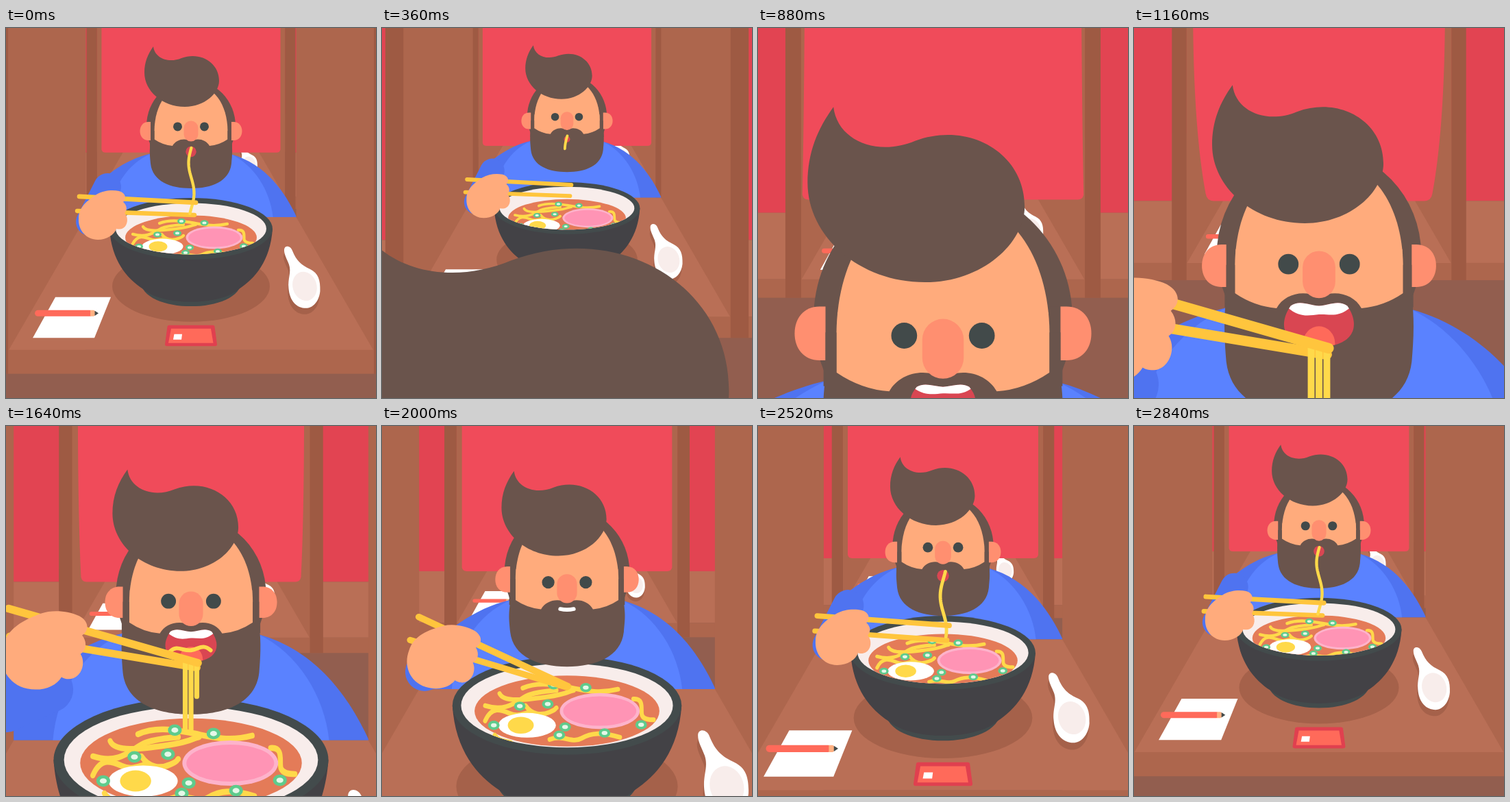
These frames come from a looping animation (540 by 540 pixels, 2880 ms). An HTML page with a canvas:

```html
<!DOCTYPE html>
<html lang="en">
<head>
<meta charset="utf-8">
<title>Endless noodles</title>
<style>
html, body { margin: 0; width: 100%; height: 100%; overflow: hidden; background: #ad664d; }
canvas { display: block; width: 100vmin; height: 100vmin; }
</style>
</head>
<body>
<canvas id="stage" width="540" height="540"></canvas>
<script>
const ctx = document.getElementById('stage').getContext('2d');
const LOOP = 2880, DEPTH = 0.945, VX = 270, VY = 9.3;
const C = {
  wall: '#ad664d', table: '#b96f56', shade: '#a5614a', pillar: '#9e5a43', floor: '#925e4f',
  red: '#f04b5a', sideRed: '#e24452', skin: '#ffab7c', blush: '#ff8f70', hair: '#6a544c',
  blue: '#5a82ff', arm: '#4f73f0', rim: '#434b4c', bowl: '#434246', cream: '#f8edeb',
  broth: '#e47b58', noodle: '#ffd94a', stick: '#ffc53d', dark: '#424a4a', mouth: '#d94652',
  coral: '#ff6a5a', white: '#fff'
};

const lerp = (a, b, p) => a + (b - a) * p;
const ramp = (t, a, b) => Math.min(1, Math.max(0, (t - a) / (b - a)));
const ease = p => p * p * (3 - 2 * p);

// Eased interpolation between [time, vector] keys.
function at(keys, t) {
  let i = 0;
  while (i < keys.length - 2 && t > keys[i + 1][0]) i++;
  const [t0, a] = keys[i], [t1, b] = keys[i + 1], p = ease(ramp(t, t0, t1));
  return a.map((v, j) => lerp(v, b[j], p));
}

function fill(color, d) { ctx.fillStyle = color; ctx.fill(new Path2D(d)); }
function stroke(color, width, d) {
  ctx.strokeStyle = color;
  ctx.lineWidth = width;
  ctx.lineCap = ctx.lineJoin = 'round';
  ctx.stroke(new Path2D(d));
}
function rect(color, x, y, w, h) { ctx.fillStyle = color; ctx.fillRect(x, y, w, h); }
function ellipse(color, x, y, rx, ry = rx, turn = 0) {
  ctx.fillStyle = color;
  ctx.beginPath();
  ctx.ellipse(x, y, rx, ry, turn, 0, 7);
  ctx.fill();
}
function group(draw) { ctx.save(); draw(); ctx.restore(); }

// skull, hair, face, jaw | hand x, y, turn | upper stick | lower stick | elbow | mouth opening
const DOWN = [11.5, 22.5, 21, 18.6, 140.5, 241, 18, 116, 201, 271, 273, 107, 225, 270, 274, 122, 258, 0];
const LIFT = [6, 14.5, 11.5, 19.6, 142, 197, 12, 112, 162, 276, 209, 113, 186, 275, 213, 110, 249, 1];
const SLURP = [13, 14, 13.5, 11.5, 140.5, 272.6, 1, 108, 245.5, 278, 258, 105, 265, 275, 277, 122, 283, 0];
const REST = [0, 0, 0, 0, 140.5, 272.6, 0, 107, 246, 277, 255, 104, 267, 275, 273, 122, 283, 0];
const POSES = [[-2180, DOWN], [-1800, LIFT], [-1210, LIFT], [-910, DOWN], [-830, DOWN],
  [-430, SLURP], [-370, SLURP], [-30, REST], [0, REST]];
const CURTAIN = [[100, [2.3]], [1150, [-0.3]], [1900, [0]]];

function drawRoom() {
  for (const side of [-1, 1]) group(() => {
    ctx.translate(VX, 0);
    ctx.scale(side, 1);
    rect(C.sideRed, 296, -60, 1500, 405);
    rect(C.table, 296, 345, 1500, 125);
    rect(C.wall, 153.6, -60, 114, 531);
    rect(C.wall, 0, 470, 1800, 35);
    rect(C.pillar, 267, -60, 29.5, 565);
  });
  rect(C.floor, -1530, 505, 3600, 1600);
}

function drawBody() {
  group(() => {
    ctx.beginPath();
    ctx.rect(116.4, 100, 307.2, 176);
    ctx.clip();
    fill(C.arm, 'M212 183C160 195 118 235 98 280H426C410 244 382 199 328 184Z');
    fill(C.blue, 'M212 183C175 199 153 236 150 280H390C387 240 364 201 328 184Z');
  });
}

function drawTable() {
  fill(C.table, 'M116.4 276H423.6L536 470H4Z');
  ellipse(C.shade, 270, 377, 115, 52);
  fill(C.white, 'M72 393H153L129 452.5H39Z');
  stroke(C.coral, 9, 'M46.5 416.5H122');
  fill('#ffb183', 'M123 412H128L132 415V418L128 421H123Z');
  fill(C.dark, 'M129.5 412.8L135 416.5L129.5 420.2Z');
  fill('#e0404f', 'M238 434H302Q304 434 304.5 436L308 462Q308 464.5 305 464.5H235Q232 464.5 232 462L235.5 436Q236 434 238 434Z');
  fill(C.coral, 'M241 439H299L302.5 460H237Z');
  fill(C.white, 'M245.5 447H257L256 455H244Z');
  const spoon = 'M406 324C406 317 415 317 418 325C424 340 431 346 444 352C456 358 459 368 458.5 384C457 400 447 409 438 409C424 409 414 398 412.5 380C411 365 417 357 413 345C410 337 406 331 406 324Z';
  group(() => { ctx.translate(-1, 9); fill(C.shade, spoon); });
  fill(C.white, spoon);
  ellipse(C.cream, 436, 377, 17.5, 21.5, -0.3);
}

const NOODLES = ['M-85 9C-78-5-68-1-60 2S-48 3-39 1', 'M-85-5C-60 2-50-12-39-15S-22-18-11-19',
  'M-70-16C-66-8-45-10-21-13S0-18 7-19', 'M-46-21C-30-27-14-24 0-22S30-15 53-20',
  'M69-11C81-12 76 0 78 4S86 8 90 8', 'M-18 26C-4 21 5 30 15 25S36 19 55 24',
  'M-43-5C-36 4-26 4-18 1S-13-2-11-3', 'M-75 22C-70 29-62 27-58 29'];
const HERBS = [[-49, -4.5], [-20, -6.5], [19.5, -21.5], [-76, 13], [-2, 14.5], [-8, 22], [39, 20], [77, 12.5], [-14, -24]];

// The bowl is seen more from above the nearer it is.
function drawBowl(d) {
  const ry = Math.max(25, 45 - 21 * (d - 1));
  fill(C.rim, 'M196 368C197 419 343 419 344 368Z');
  fill(C.bowl, 'M151 293C154 340 177 366 200 381C228 406 312 406 340 381C363 366 386 340 389 293Z');
  ellipse(C.rim, 270, 293, 119, ry);
  group(() => {
    ctx.beginPath();
    ctx.ellipse(270, 293, 110, ry - 7.5, 0, 0, 7);
    ctx.clip();
    rect(C.cream, 150, 200, 240, 200);
    ctx.translate(270, 306 - 1.2 * (ry - 45));
    ctx.scale(1, ry / 45);
    ellipse(C.broth, 0, 0, 96, 32.5);
    NOODLES.forEach(n => stroke(C.noodle, 4.3, n));
    ellipse(C.white, -41.5, 13, 30, 11.3);
    ellipse(C.noodle, -48, 13, 13.5, 7.7);
    ellipse('#fdb3cb', 34, 0, 41.5, 16.5);
    ellipse('#ff94b5', 34, 0, 38, 13.5);
    for (const [x, y] of HERBS) {
      ellipse('#5ecb8c', x, y, 6, 4.2);
      ellipse('#e6f7e8', x, y, 3, 1.9);
    }
  });
}

function drawMouth(tau, face, open) {
  group(() => {
    ctx.translate(270, 168.5 + face);
    if (open > 0.12) {
      ctx.scale(lerp(0.5, 1, open), lerp(0.25, 1, open));
      ctx.clip(new Path2D('M-18 2C-12-2-6 2 0 2S12-2 18 2C27 15 22 28 0 28S-27 15-18 2Z'));
      rect(C.mouth, -30, -5, 60, 40);
      ellipse(C.coral, 0, 26, 10.2, 11);
      if (tau > -1450) stroke(C.noodle, 3.5, 'M-18 19C-12 13-7 19 0 18S10 12 17 18');
      fill(C.white, 'M-20 0V3C-12 10-6 8 0 7.5S12 10 20 3V-4H-20Z');
    } else if (tau < -720) {
      stroke(C.white, 4, 'M-7 3.2Q0 4.8 7 3.2');
    } else {
      ellipse(C.mouth, 0, 12, lerp(7.7, 3.3, ramp(tau, 150, 500)));
    }
  });
}

function drawHead(tau, skull, hair, face, jaw, open) {
  group(() => {
    ctx.translate(0, skull);
    ellipse(C.hair, 270, 143, 65, 67);
    rect(C.skin, 214, 140, 112, 50);
    for (const side of [-1, 1]) group(() => {
      ctx.translate(270, 0);
      ctx.scale(side, 1);
      rect(C.hair, 53, 137, 7, 40);
      fill(C.blush, 'M59 137H62C70 137 74.5 143 74.5 150.5S70 164 62 164H59Z');
    });
    fill(C.skin, 'M216.5 180V150C217 112 236 82 270 82S323 112 323.5 150V180Z');
  });
  const f = y => y + face, j = y => y + jaw;
  fill(C.hair, `M211 ${150 + skull}H216.5V${f(162.5)}Q229 ${f(171)} 243 ${f(172)}
    C248 ${f(163)} 260 ${f(160)} 270 ${f(165)}C280 ${f(160)} 292 ${f(163)} 297 ${f(172)}
    Q311 ${f(171)} 323.5 ${f(162.5)}V${150 + skull}H329V${f(165)}
    C331 ${f(180)} 330 ${j(186)} 329 ${j(198)}C326 ${j(224)} 300 ${j(234)} 270 ${j(234)}
    S214 ${j(224)} 211 ${j(198)}C210 ${j(186)} 209 ${f(180)} 211 ${f(165)}Z`);
  drawMouth(tau, face, open);
  ellipse(C.dark, 250.5, f(144), 6.5);
  ellipse(C.dark, 289.5, f(144), 6.5);
  stroke(C.blush, 20.8, `M270 ${f(146)}V${f(155.2)}`);
  group(() => {
    ctx.translate(0, hair);
    fill(C.hair, 'M215 27C217 44 237 52 256 44C283 34 311 50 311 77C311 95 290 115 261 115C228 115 202 92 202 65C202 50 207 38 215 27Z');
  });
}

function drawNoodles(tau, face, tipX, tipY) {
  if (tau > -2180 && tau < -1050) {
    [-11, -6, -1].forEach((dx, i) => {
      const start = i === 2 ? -1370 : -1250;
      const end = lerp(270, tipY, ramp(tau, start, start + 250));
      if (end > tipY + 2) stroke(C.noodle, 4.3, `M${tipX + dx} ${tipY}V${end}`);
    });
  }
  if (tau > -640 && tau < 450) {
    const top = 175 + face;
    const end = lerp(top, 274, ramp(tau, -640, -420) * (1 - ramp(tau, 60, 450)));
    let d = '';
    for (let y = top; y < end; y += 3) {
      const x = 270.5 - 4 * Math.sin((y - top) * Math.PI / 44 - face * 0.05);
      d += (d ? 'L' : 'M') + x + ' ' + y;
    }
    stroke(C.noodle, 4.3, d);
  }
}

const HAND = 'M106 278C106 262 118 252 132 243C142 237 155 236 165 238C175 241 176 249 171 254C177 259 177 266 173 270C179 276 178 288 171 292C168 294 163 294 161 293C158 302 147 309 134 309C117 309 105 295 106 278Z';

function drawHand(x, y, turn) {
  group(() => {
    ctx.translate(x, y);
    ctx.rotate(turn * Math.PI / 180);
    ctx.translate(-140.5, -272.6);
    fill(C.skin, HAND);
  });
}

// Positive lift swings the hem up towards the viewer, negative away.
function drawCurtain(tau) {
  const [lift] = at(CURTAIN, tau);
  if (lift > 1.8) return;
  const up = Math.max(0, lift), back = Math.max(0, -lift);
  const top = 254 + 50 * up, low = 254 + 85 * lift, y = 345 - 198 * up;
  const bulge = (top * 2 + low) / 3 + back * 30, r = 9 + 20 * back;
  const L = x => 270 - x, R = x => 270 + x;
  fill(C.red, `M${L(top)} -60Q${L(bulge)} ${y * 0.55} ${L(low)} ${y - r}
    Q${L(low - 2)} ${y} ${L(low - r - 2)} ${y}H${R(low - r - 2)}Q${R(low - 2)} ${y} ${R(low)} ${y - r}
    Q${R(bulge)} ${y * 0.55} ${R(top)} -60Z`);
}

function drawBooth(tau) {
  const d = 1 + DEPTH * tau / LOOP;
  const [skull, hair, face, jaw, hx, hy, turn, ax, ay, bx, by, cx, cy, ex, ey, elbowX, elbowY, open] = at(POSES, tau);
  group(() => {
    ctx.translate(VX, VY);
    ctx.scale(1 / d, 1 / d);
    ctx.translate(-VX, -VY);
    drawRoom();
    drawBody();
    drawTable();
    drawBowl(d);
    drawHead(tau, skull, hair, face, jaw, open);
    stroke(C.arm, 40, `M148 232L${elbowX} ${elbowY}L${hx - 12} ${hy + 8}`);
    stroke(C.stick, 6.5, `M${cx} ${cy}L${ex} ${ey}`);
    drawNoodles(tau, face, bx, by);
    stroke(C.stick, 6.8, `M${ax} ${ay}L${bx} ${by}`);
    drawHand(hx, hy, turn);
    drawCurtain(tau);
  });
}

const start = performance.now();
function frame() {
  const t = (performance.now() - start) % LOOP;
  rect(C.wall, 0, 0, 540, 540);
  for (let n = 3; n >= -1; n--) drawBooth(t + n * LOOP);
  requestAnimationFrame(frame);
}
frame();
</script>
</body>
</html>
```
